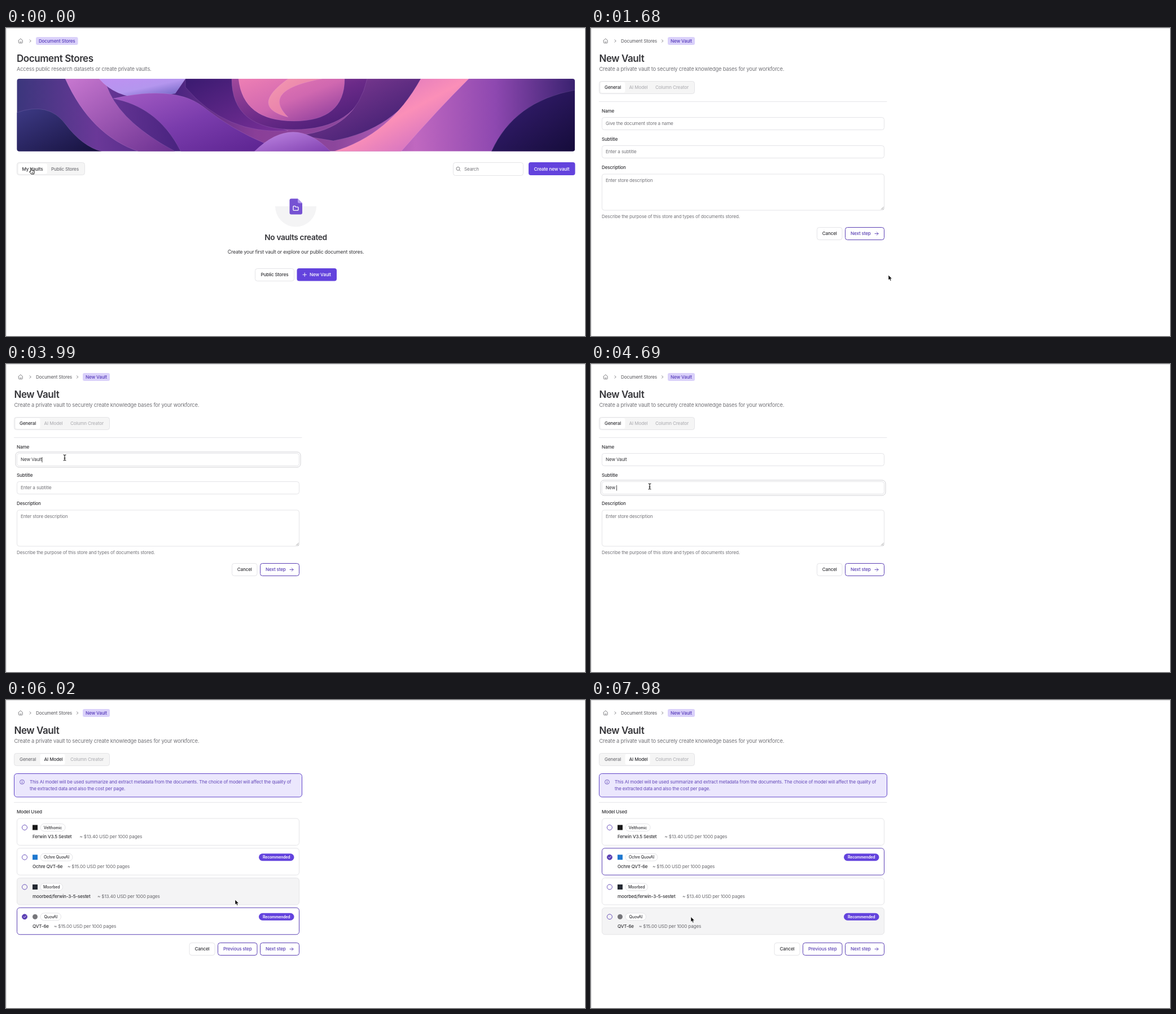
These frames come from a looping animation (1026 px wide and 546 px high, 8 s). An HTML page:

```html
<!DOCTYPE html>
<html lang="en">
<head>
<meta charset="utf-8">
<title>Document Stores</title>
<style>
html, body { margin: 0; height: 100%; overflow: hidden; background: #fff; }
svg { display: block; width: 100vw; height: 100vh; }
text { font-family: Inter, "Open Sans", sans-serif; letter-spacing: -.02em; white-space: pre; }
.head { letter-spacing: -.025em; }
</style>
</head>
<body>
<svg id="stage" viewBox="0 0 1026 546"></svg>
<script>
const INK = '#343438', GRAY = '#737378', PALE = '#b4b4b8', LINE = '#e4e4e7';
const PURPLE = '#6343dd', VIOLET = '#5b40b4';
const $ = id => document.getElementById(id);

// y is the middle of the capitals
const text = (x, y, s, { z = 8.15, w = 400, c = INK, a = 'start', id = '', cls = '' } = {}) =>
  `<text id="${id}" class="${cls}" x="${x}" y="${y + z * .36}" font-size="${z}" font-weight="${w}" fill="${c}" text-anchor="${a}">${s}</text>`;
const box = (x, y, w, h, r = 4, fill = '#fff', stroke = LINE, id = '') =>
  `<rect id="${id}" x="${x}" y="${y}" width="${w}" height="${h}" rx="${r}" fill="${fill}" stroke="${stroke}"/>`;
const line = (d, c = GRAY, w = .9) =>
  `<path d="${d}" fill="none" stroke="${c}" stroke-width="${w}" stroke-linecap="round" stroke-linejoin="round"/>`;
const group = (id, s) => `<g id="${id}">${s}</g>`;
const button = (x, y, w, s, c = INK, stroke = LINE) =>
  box(x + .5, y + .5, w - 1, 22, 4, '#fff', stroke) + text(x + w / 2, y + 11.5, s, { w: 500, c, a: 'middle' });
const nextButton = y => box(450.5, y + .5, 69, 22, 4, '#fff', VIOLET) +
  text(460, y + 11.5, 'Next step', { w: 500, c: VIOLET }) +
  line(`M503 ${y + 11.5}h6m-2.7-2.7l2.7 2.7l-2.7 2.7`, VIOLET);
const crumb = (x, w, s) => box(x, 16, w, 14, 3, '#dad1fa', 'none') +
  text(x + w / 2, 23, s, { w: 500, c: '#573cba', a: 'middle' });
const chevron = x => line(`M${x - 1} 20.8l2.2 2.2l-2.2 2.2`);
const heading = (x, title, sub) => text(x, 53.5, title, { z: 17, w: 600, cls: 'head' }) +
  text(x, 73, sub, { z: 9.3, c: GRAY });

const gradient = (id, colors, y2) => `<linearGradient id="${id}" x2="1" y2="${y2}">` +
  colors.map((c, i) => `<stop offset="${i / (colors.length - 1)}" stop-color="${c}"/>`).join('') + '</linearGradient>';
const sky = ['#3b367c', '#6a3898', '#4a2480', '#8a3f98', '#8c469c', '#c068c0', '#8e48b0', '#3a2270'];
const ribbons = [
  ['M19 150Q75 130 105 170T170 219H19Z', '#3d3a85', '#15103c'],
  ['M105 90H175Q190 160 300 219H235Q150 190 105 90Z', '#c878d0', '#6a3090'],
  ['M165 90H318L300 116L262 122Q200 130 165 90Z', '#bf90f2', '#b496ee', '#6058b8'],
  ['M318 90H415Q430 160 500 182Q390 190 318 105Z', '#3a1a70', '#7a3098'],
  ['M190 125Q300 100 350 140T460 205L440 219H310Q270 140 190 125Z', '#a45cc4', '#7a3cac', '#5b2390'],
  ['M400 90H645Q620 180 510 180T400 90Z', '#a0489c', '#6a2a88', '#3f1a70'],
  ['M412 90H600Q600 165 510 165T412 90Z', '#ee7fb4', '#d068b0', '#83389a'],
  ['M500 90H560Q450 110 500 158Q430 140 500 90Z', '#f49ab0', '#e070a8'],
  ['M640 90H740Q690 180 580 200L520 190Q620 180 640 90Z', '#8a4098', '#32186a'],
  ['M440 219Q510 150 575 219Z', '#c088e4', '#8040b0'],
  ['M735 90H820Q760 150 700 219H580Q680 190 735 90Z', '#c868c4', '#fb8fb8', '#b860c8'],
  ['M860 219Q900 130 1008 110V219Z', '#3a2078', '#150c3a'],
];
const banner = '<clipPath id="frame"><rect x="19.5" y="90" width="988.5" height="128.5" rx="4"/></clipPath><g clip-path="url(#frame)">' +
  gradient('sky', sky, 0) + '<path d="M19 90H1008V219H19Z" fill="url(#sky)"/>' +
  ribbons.map(([d, ...colors], i) => gradient('rib' + i, colors, 1) +
    `<path d="${d}" fill="url(#rib${i})" stroke="#f0c4ff" stroke-opacity=".2" stroke-width=".7"/>`).join('') + '</g>';

const home = crumb(53, 74.5, 'Document Stores') +
  heading(19, 'Document Stores', 'Access public research datasets or create private vaults.') + banner +
  box(19.5, 238.5, 120, 22, 4, '#f5f5f5') + box(22, 240.5, 51, 18, 3, '#fff', 'none') +
  text(28.5, 250, 'My Vaults', { w: 500 }) + text(80, 250, 'Public Stores', { w: 500, c: GRAY }) +
  box(792.5, 238.5, 124, 23) + '<circle cx="801" cy="249.4" r="3" fill="none" stroke="#737378" stroke-width=".9"/>' +
  line('M803.3 251.7l1.7 1.7') + text(812, 250, 'Search', { c: GRAY }) +
  box(926, 238, 82.5, 23, 4, PURPLE, 'none') + text(967, 250, 'Create new vault', { w: 500, c: '#fff', a: 'middle' }) +
  '<path d="M477 316a36.5 36.5 0 0 0 73 0z" fill="#f4f4f5"/>' +
  '<path d="M505.5 302.5H517L525 310.5V327.5a3 3 0 0 1-3 3H505.5a3 3 0 0 1-3-3V305.5a3 3 0 0 1 3-3z" fill="#7652d3"/>' +
  '<path d="M517 302.5L525 310.5H519a2 2 0 0 1-2-2z" fill="#b39cf0"/>' +
  line('M509 316.3v6a1 1 0 0 0 1 1h7a1 1 0 0 0 1-1v-4a1 1 0 0 0-1-1h-3.5l-1.3-1.6h-2.2a1 1 0 0 0-1 1z', '#fff', 1.3) +
  text(513.5, 371, 'No vaults created', { z: 13.7, w: 600, a: 'middle', cls: 'head' }) +
  text(513.5, 396.5, 'Create your first vault or explore our public document stores.', { z: 8.78, a: 'middle' }) +
  button(441, 426, 70, 'Public Stores') + box(515.5, 426, 70.5, 22.5, 4, PURPLE, 'none', 'newVault') +
  line('M526 437.3h6.4m-3.2-3.2v6.4', '#fff') + text(538, 437.5, 'New Vault', { w: 500, c: '#fff' });

const shell = text(53, 23, 'Document Stores', { c: '#55555a' }) + chevron(126.5) + crumb(136, 48, 'New Vault') +
  heading(14.5, 'New Vault', 'Create a private vault to securely create knowledge bases for your workforce.');
const tabs = (x, w, general, model) => box(14.5, 94.5, 169, 22, 4, '#f5f5f5') + box(x, 96, w, 18.5, 3, '#fff', 'none') +
  text(24, 105, 'General', { w: 500, c: general }) + text(67.5, 105, 'AI Model', { w: 500, c: model }) +
  text(114, 105, 'Column Creator', { w: 500, c: PALE });

const fields = [
  { label: 'Name', hint: 'Give the document store a name', y: 158, h: 23, focus: 3430, type: 3500, done: 3990, blur: 4410 },
  { label: 'Subtitle', hint: 'Enter a subtitle', y: 208, h: 23, focus: 4410, type: 4480, done: 4970, blur: 5040 },
  { label: 'Description', hint: 'Enter store description', y: 258.5, h: 65, focus: 5040, type: 5040, done: 5250, blur: 8000 },
];
const form = tabs(17, 43.5, INK, PALE) + line('M14.5 130.5H524', LINE) +
  fields.map((f, i) => text(19, f.y - 11, f.label, { w: 500 }) +
    box(17, f.y - 2, 505, f.h + 4, 6, '#fff', '#d0d0d4', 'ring' + i) +
    box(19.5, f.y + .5, 500, f.h - 1) + text(26, f.y + 11.5, f.hint, { id: 'value' + i })).join('') +
  '<path id="caret" stroke="#222" stroke-width=".8"/>' +
  line('M514.3 321.5l4-4M516.8 321.7l1.6-1.6', '#777', .7) +
  text(19, 334, 'Describe the purpose of this store and types of documents stored.', { c: GRAY }) +
  button(400, 353, 45.5, 'Cancel') + nextButton(353);

const models = [
  { by: 'Velthomic', name: 'Ferwin V3.5 Sestet', cost: '13.40', x: 130.5, w: 44, logo: '#191919' },
  { by: 'Ochre QuovAI', name: 'Ochre QVT-6e', cost: '15.00', x: 109, w: 57, logo: '#1f78cf', star: true },
  { by: 'Moorbed', name: 'moorbed/ferwin-3-5-sestet', cost: '13.40', x: 162, w: 39.5, logo: '#252a33' },
  { by: 'QuovAI', name: 'QVT-6e', cost: '15.00', x: 85, w: 36.5, logo: '#77777b', round: true, star: true },
];
const ROW_H = 47.5, rowTop = i => 210 + i * 52.75;
const row = (m, i) => {
  const y = rowTop(i), mid = y + 16;
  return box(19.5, y, 500, ROW_H, 5, '#fff', LINE, 'row' + i) +
    `<circle id="radio${i}" cx="33" cy="${mid}" r="4.5" stroke="${VIOLET}" stroke-width=".9"/>` +
    group('check' + i, line(`M31 ${mid}l1.5 1.5l2.7-2.9`, '#fff')) +
    `<rect x="47" y="${mid - 4.5}" width="9" height="9" rx="${m.round ? 4.5 : 0}" fill="${m.logo}"/>` +
    box(61, mid - 6.5, m.w, 13, 6.5) + text(61 + m.w / 2, mid, m.by, { z: 7.05, w: 500, a: 'middle' }) +
    text(47, y + 32.5, m.name, { w: 500, z: 8.05 }) +
    text(m.x, y + 32.5, `~ $${m.cost} USD per 1000 pages`, { c: '#66666b' }) +
    (m.star ? box(448, mid - 6.5, 62.5, 13, 6.5, PURPLE, 'none') +
      text(479.2, mid, 'Recommended', { z: 6.9, w: 600, c: '#fff', a: 'middle' }) : '');
};
const notice = { z: 8.13, c: '#6246b8' };
const picker = tabs(60.5, 44, GRAY, INK) + box(14.5, 130.5, 510, 41.5, 5, '#ebe7fd', '#6045c8') +
  `<circle cx="28.5" cy="145.3" r="3.9" fill="none" stroke="${VIOLET}" stroke-width=".8"/>` +
  line('M28.5 145v2.2M28.5 143.3v.1', VIOLET) +
  text(42, 145.5, 'This AI model will be used summarize and extract metadata from the documents. The choice of model will affect the quality of', notice) +
  text(42, 157, 'the extracted data and also the cost per page.', notice) +
  line('M14.5 181.5H524', LINE) + text(19, 198.5, 'Model Used', { w: 500 }) + models.map(row).join('') +
  button(324.5, 430, 46, 'Cancel') + button(375, 430, 70.5, 'Previous step', VIOLET, VIOLET) + nextButton(430);

const pointers = {
  arrow: '<path d="M0 0V8.8L2 7L3.4 10.2L5 9.5L3.6 6.4H6.4Z" fill="#000" stroke="#fff" stroke-width=".6"/>',
  hand: '<path d="M-1 1C-1-.4 1-.4 1 1V4L4.7 4.8Q6 5.2 5.8 6.6L5 10.5H.3L-2.8 6.9Q-3.3 5.6-1.9 5.6L-1 6.3Z" fill="#fff" stroke="#000" stroke-width=".9" stroke-linejoin="round"/>' +
    line('M1.5 7v2M3.2 7v2', '#000', .6),
  beam: line('M-2-5Q0-5 0-4Q0-5 2-5M0-4V4M-2 5Q0 5 0 4Q0 5 2 5M-1 1H1', '#000', 1),
};

$('stage').innerHTML = '<path d="M.5 546V0M0 .5H1026" stroke="#dcdcde" fill="none"/>' +
  line('M22.4 21.8l3.4-2.9l3.4 2.9v4a.9.9 0 0 1-.9.9h-5a.9.9 0 0 1-.9-.9zM24.4 24.7q1.4.8 2.8 0') + chevron(43) +
  group('home', home) + group('vault', shell + group('form', form) + group('picker', picker)) +
  group('pointer', Object.entries(pointers).map(([id, s]) => group(id, s)).join(''));

// time, x, y of the pointer
const track = [
  [0, 44.5, 248.5], [70, 260, 301], [140, 476, 354], [210, 476, 354], [490, 454, 394], [910, 529.5, 438.5], [1330, 529.5, 438.5],
  [1470, 530, 446], [1610, 529.5, 438.5], [1680, 527, 438], [1960, 527, 438], [2170, 315, 234], [2310, 315, 234],
  [2870, 87, 109], [3220, 87, 109], [3430, 104, 166], [4130, 104, 166], [4410, 104, 217], [4970, 104, 217],
  [5040, 104, 268], [5320, 104, 268], [5530, 425, 347], [5740, 484, 362], [5950, 484, 362], [6160, 250, 338],
  [6300, 130, 170], [6440, 130, 170], [6720, 122, 256], [6860, 140, 284], [7140, 140, 284], [7490, 185, 386],
  [7770, 178, 340], [7840, 178, 340], [7980, 177, 384.5], [8000, 177, 384.5],
];
const STEP = 70, LOOP = 8000, FORM_AT = 1680, PICKER_AT = 5950, PICK_AT = 6930;

function pointerAt(t) {
  const i = track.findIndex(k => k[0] > t), [t0, x0, y0] = track[i - 1], [t1, x1, y1] = track[i];
  const p = (t - t0) / (t1 - t0);
  return [x0 + (x1 - x0) * p, y0 + (y1 - y0) * p];
}
const set = (id, attrs) => { for (const k in attrs) $(id).setAttribute(k, attrs[k]); };
const show = (id, on) => set(id, { display: on ? 'inline' : 'none' });

function drawForm(t) {
  fields.forEach((f, i) => {
    const p = Math.min(1, Math.max(0, (t - f.type) / (f.done - f.type)));
    const typed = 'New Vault'.slice(0, Math.ceil(9 * p)), value = $('value' + i);
    value.textContent = typed || f.hint;
    value.setAttribute('fill', typed ? INK : GRAY);
    const focused = t >= f.focus && t < f.blur;
    show('ring' + i, focused);
    if (focused) {
      const x = 26.5 + (typed ? value.getComputedTextLength() : 0);
      set('caret', { d: `M${x} ${f.y + 7}v9.5` });
    }
  });
  show('caret', t >= fields[0].focus);
}

function drawPicker(t, inside) {
  const picked = t < PICK_AT ? 3 : 1;
  models.forEach((m, i) => {
    const on = i === picked, hover = !on && inside(19, rowTop(i), 520, rowTop(i) + ROW_H);
    set('row' + i, { fill: hover ? '#f4f4f5' : '#fff', stroke: on ? VIOLET : LINE });
    set('radio' + i, { fill: on ? VIOLET : 'none' });
    show('check' + i, on);
  });
}

function draw(now) {
  const t = Math.floor(now % LOOP / STEP) * STEP;
  const [x, y] = pointerAt(t);
  const inside = (l, top, r, b) => x >= l && x <= r && y >= top && y <= b;
  const onHome = t < FORM_AT, onForm = !onHome && t < PICKER_AT;
  show('home', onHome);
  show('vault', !onHome);
  show('form', onForm);
  show('picker', t >= PICKER_AT);

  let kind = 'arrow';
  if (onHome) {
    const hover = inside(516, 426, 586, 449);
    set('newVault', { fill: hover ? '#7557e4' : PURPLE });
    if (hover || inside(441, 426, 511, 449) || inside(22, 240, 139, 260)) kind = 'hand';
  } else if (onForm) {
    drawForm(t);
    if (inside(400, 353, 520, 376)) kind = 'hand';
    else if (fields.some(f => inside(19, f.y, 520, f.y + f.h))) kind = 'beam';
  } else drawPicker(t, inside);

  for (const k in pointers) show(k, k === kind);
  set('pointer', { transform: `translate(${x} ${y})` });
  requestAnimationFrame(() => draw(performance.now()));
}
draw(0);
</script>
</body>
</html>
```
